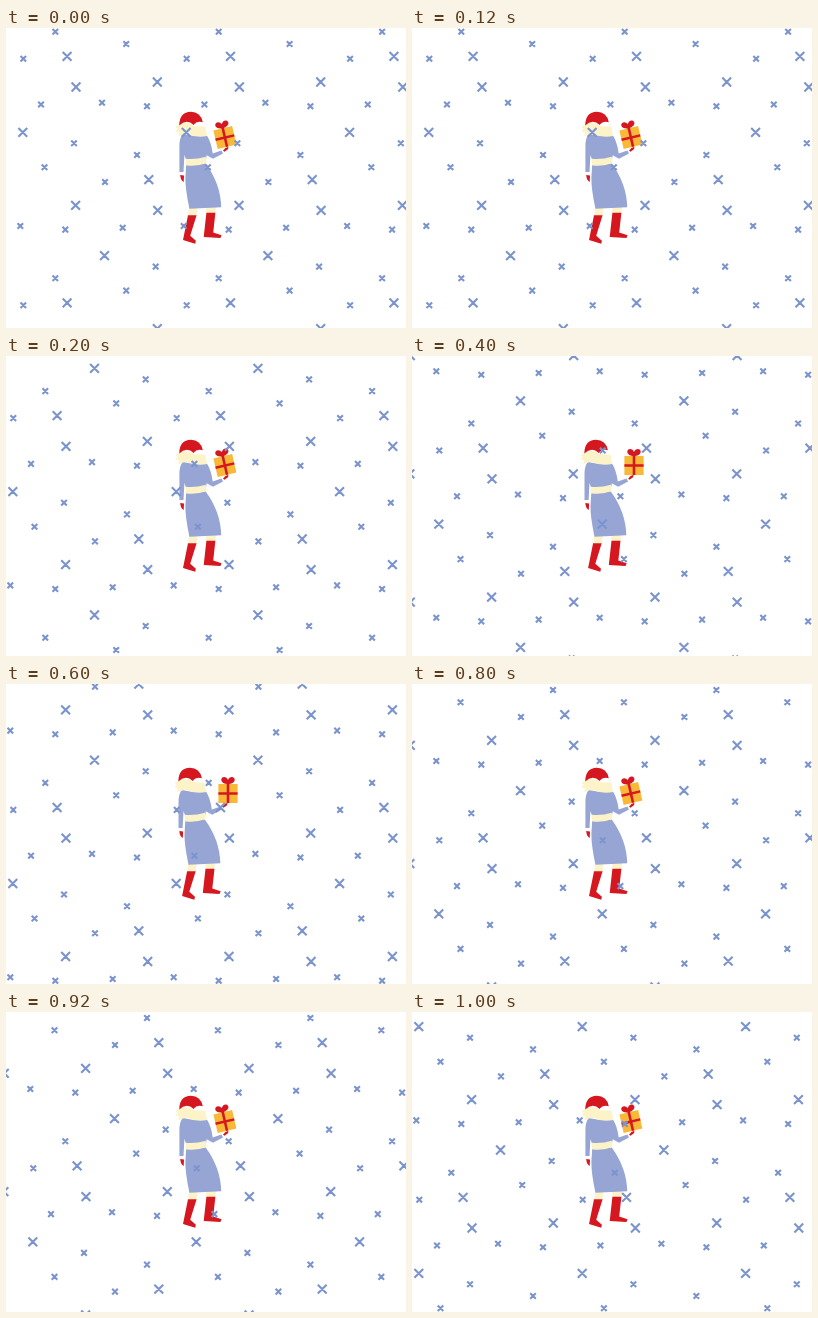
Animation, 400 px wide and 300 px high, one loop 1200 ms. Source, as an HTML page with a canvas:

```html
<!DOCTYPE html>
<html lang="en">
<head>
<meta charset="utf-8">
<title>Winter gift</title>
<style>
html, body { margin: 0; width: 100%; height: 100%; overflow: hidden; background: #fff; }
canvas { display: block; }
</style>
</head>
<body>
<canvas id="stage" width="400" height="300"></canvas>
<script>
const ctx = document.getElementById('stage').getContext('2d');
const STEP = 200, STEPS = 6, FALL = 31.4, SWING = 10;
const RED = '#d5171f', BLUE = '#97a5d5', CREAM = '#fdf3c9', GOLD = '#f9b838', SNOW = '#7c94cd';

// The snow is a half-drop repeat: every second row is shifted by half a tile
const TILE_W = 163.4, ROW_H = 123.3;
const small = [[35, 76.5], [96, 74.7], [141, 78.3], [68, 115.3], [131, 127], [38.5, 139.3], [99, 154]];
const large = [[70, 59], [151.3, 54], [16.8, 104.3], [142.8, 151.6]];

function shape(color, d) {
  ctx.fillStyle = color;
  ctx.fill(new Path2D(d));
}

function crosses(list, r, width, dx, dy) {
  ctx.strokeStyle = SNOW;
  ctx.lineWidth = width;
  ctx.beginPath();
  for (const [px, py] of list) {
    for (let row = -3; row < 3; row++) {
      const y = py + dy + row * ROW_H;
      const shift = row % 2 ? TILE_W / 2 : 0;
      for (let x = px + dx + shift - 2 * TILE_W; x < 410; x += TILE_W) {
        ctx.moveTo(x - r, y - r);
        ctx.lineTo(x + r, y + r);
        ctx.moveTo(x + r, y - r);
        ctx.lineTo(x - r, y + r);
      }
    }
  }
  ctx.stroke();
}

function gift(upright) {
  ctx.save();
  ctx.translate(upright ? 222 : 218.9, 109.5);
  ctx.rotate(upright ? 0 : -13 * Math.PI / 180);
  shape(GOLD, 'M-9.6 -9.5H9.6V9.5H-9.6Z');
  shape(RED, 'M-1.3 -10H1.3V9.5H-1.3ZM-9.6 -1.2H9.6V1.3H-9.6Z');
  shape(RED, 'M0 -9.4C-3 -9.4 -7 -11 -6.7 -14C-6 -17.7 -1.2 -17 0 -13.6C1.2 -17 6 -17.7 6.7 -14C7 -11 3 -9.4 0 -9.4Z');
  ctx.restore();
}

function figure(upright) {
  ctx.save();
  ctx.translate(upright ? -0.7 : 0.2, 0);
  // boots with fur trims
  shape(CREAM, 'M182.8 180H191.5L190.3 187.5H182ZM200 179H209.8L209.2 185H200Z');
  shape(RED, 'M181.8 187.3H190.4L184 207.8L189.7 212.8L189 215.8L176.8 212Z');
  shape(RED, 'M200.2 184.8H209.2L207 204.5L215.4 207.2L214.2 210L197.5 208.9Z');
  // coat
  shape(BLUE, 'M180 137L199.5 135.5Q214.5 156 215 179.3L183.2 180.7Q179 161 179.2 150Z');
  shape(BLUE, 'M176.5 106Q189 109 200.7 107.5Q205 114 206.5 125.5L215.2 122.5L216.8 125.4L206.8 130.8L200.5 127.2L199.8 131.5L180 132L178.2 127L177.3 144H173.2V119Q173 110 176.5 106Z');
  shape(CREAM, 'M179.5 130.8Q190 131.7 199.6 128.8L200.2 135Q190 139 179.7 137.3Z');
  shape(RED, 'M174 147L177.8 147.5L177.5 154Q174.5 152.5 174 147Z');
  // beard and hat
  shape(CREAM, 'M173.5 97Q181 92.5 188 98L199.2 98.8L200.8 108Q190 110.3 179.5 105.5L172 108.2L173 104.5L168.8 103L171.5 101L169 98.8Z');
  shape(RED, 'M173 97.4Q173.2 84 184.7 83.8Q194.5 84 196.6 94.2Q190.5 92.7 187.5 97Q180.5 90.5 173 97.4Z');
  // raised mitten
  shape(RED, 'M216.8 122.8L219.2 120L222.3 118.8L221.8 121.2L218.2 123.8Z');
  ctx.restore();
  gift(upright);
}

function draw(time) {
  const step = Math.floor(time / STEP) % STEPS;
  const upright = step >> 1 === 1;
  const dx = step && (step % 2 ? -SWING : SWING);
  const dy = step * FALL + (upright ? 1 : 0);
  ctx.fillStyle = '#fff';
  ctx.fillRect(0, 0, 400, 300);
  figure(upright);
  crosses(small, 2.8, 2.1, dx, dy);
  crosses(large, 4.4, 2.1, dx, dy);
}

const start = performance.now();
function loop() {
  draw(performance.now() - start);
  requestAnimationFrame(loop);
}
loop();
</script>
</body>
</html>
```
